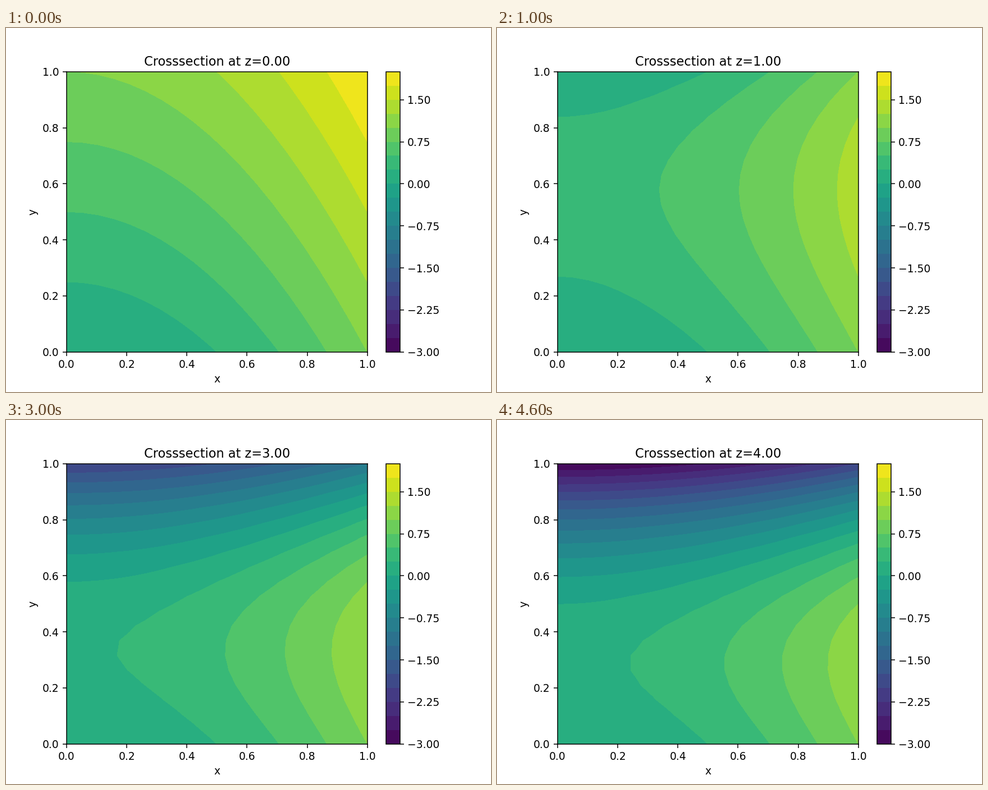
A matplotlib script for the animation above (5000 ms loop, 864 px wide and 648 px high).

```python
import matplotlib.pyplot as plt
import numpy as np
from matplotlib.animation import FuncAnimation

SLICES = 5
LEVELS = np.linspace(-3, 2, 21)

x, y = np.meshgrid(np.linspace(0, 1, 20), np.linspace(0, 1, 20))

fig, ax = plt.subplots(figsize=(6.4, 4.8), dpi=135)
sections = [ax.contourf(x, y, x**2 + y - z * y**3, levels=LEVELS, cmap="viridis")
            for z in range(SLICES)]
fig.colorbar(sections[0], ax=ax)
ax.set_xlabel("x")
ax.set_ylabel("y")
title = ax.set_title("")


def update(i):
    """Show only the cross-section at height z = i."""
    for z, section in enumerate(sections):
        section.set_visible(z == i)
    title.set_text(f"Crosssection at z={i:.2f}")
    return [*sections, title]


anim = FuncAnimation(fig, update, frames=SLICES, interval=1000,
                     repeat=True, repeat_delay=0)
plt.show()
```
